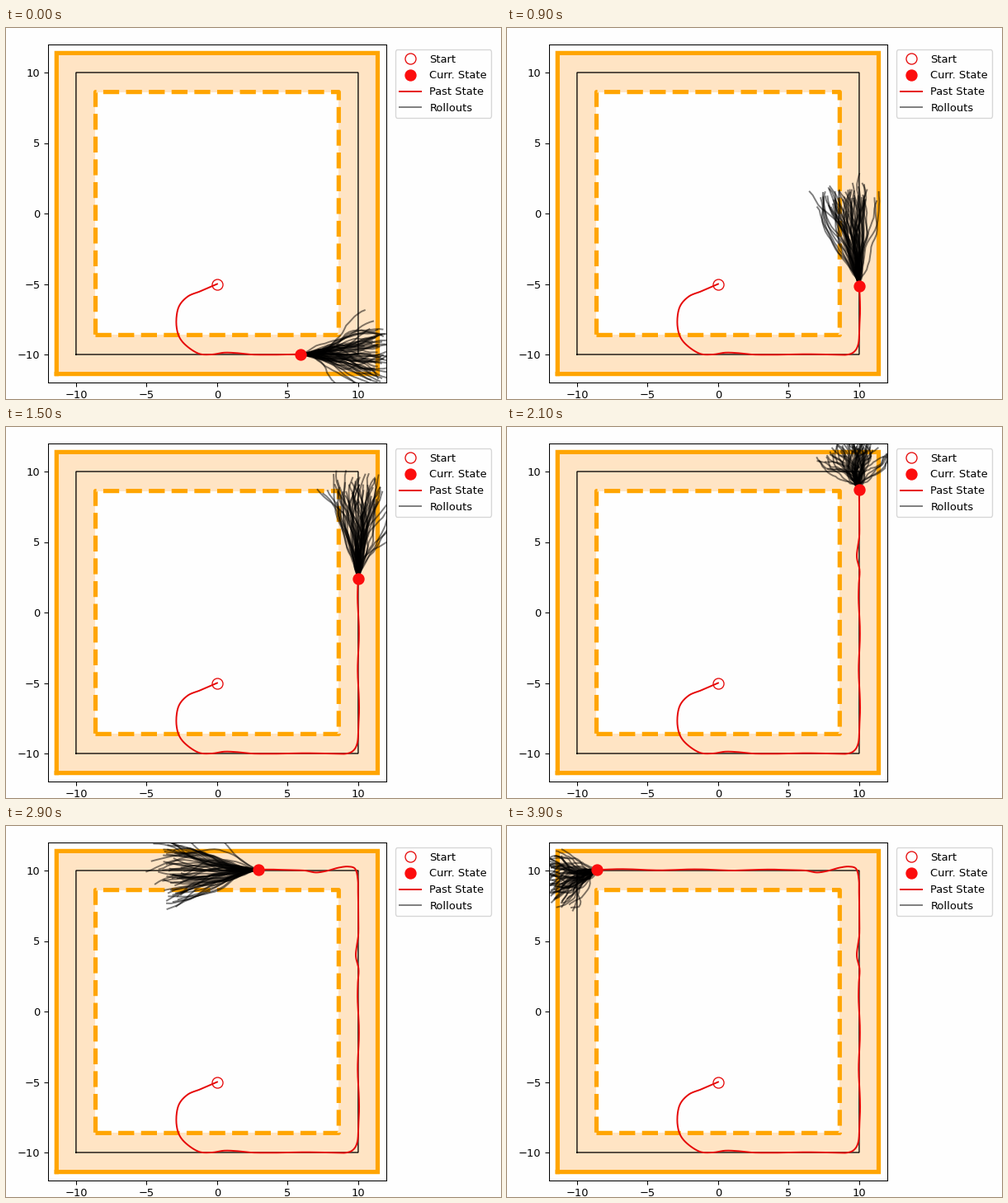
Animation of 600x450 px, one loop 4 s. Source, as a matplotlib script:

```python
import numpy as np
import matplotlib.pyplot as plt
from matplotlib.animation import FuncAnimation
from matplotlib.collections import LineCollection
from matplotlib.patches import Rectangle

W, H, DPI = 600, 450, 93.75
UNIT = 17.1              # pixels per data unit
CX, CY = 255.9, 225      # pixel position of the data origin
FRAMES, INTERVAL = 40, 100
ROLLOUTS, STEPS = 60, 20
INNER, OUTER = 8.62, 11.38
PAPER, TRAIL = "#fefefe", "#e60808"


def side(start, end, wobble=0.05):
    """Waypoints about one unit apart, swaying around a straight line."""
    start, end = np.array(start, float), np.array(end, float)
    dist = np.hypot(*(end - start))
    t = np.linspace(0, 1, round(dist) + 1)[:, None]
    normal = (end - start)[::-1] * (1, -1) / dist
    return start + t * (end - start) + wobble * np.sin(1.2 * dist * t) * normal


def smooth(p, n=16):
    """Catmull-Rom curve through the points."""
    p = np.vstack([2 * p[0] - p[1], p, 2 * p[-1] - p[-2]])
    t = np.linspace(0, 1, n, endpoint=False)[:, None]
    parts = []
    for a, b, c, d in zip(p, p[1:], p[2:], p[3:]):
        parts.append(b + 0.5 * t * (c - a + t * (2 * a - 5 * b + 4 * c - d
                                                 + t * (3 * (b - c) + d - a))))
    return np.vstack(parts + [p[-2:-1]])


path = smooth(np.vstack([
    [(0, -5), (-1.15, -5.5), (-2.1, -5.9), (-2.75, -6.7), (-2.88, -8),
     (-2.5, -9.05), (-1.4, -9.9), (-0.4, -10), (0.5, -9.87), (1.4, -9.9)],
    side((2.4, -10), (9.1, -10), 0.02),
    [(9.65, -9.8), (9.95, -9.2)],
    side((10.02, -8), (10, 3)),
    [(9.83, 4)],
    side((10, 5.3), (10, 9.3), 0.02),
    [(9.8, 10.1), (9.3, 10.28), (8.6, 10.2), (7.8, 9.98), (7, 9.86), (6.2, 10)],
    side((5, 10.03), (-10, 10.07), 0.04)]))
arc = np.r_[0, np.cumsum(np.hypot(*np.diff(path, axis=0).T))]


def point(s):
    return np.array([np.interp(s, arc, path[:, 0]), np.interp(s, arc, path[:, 1])])


def arc_near(x, y):
    return arc[np.argmin(np.hypot(*(path - (x, y)).T))]


CORNERS = [arc_near(10, -10), arc_near(10, 10), arc_near(-10, 10)]


def pace(s):
    """Frames per unit of distance; the car brakes just before each corner."""
    return 0.8 + sum(0.65 * np.exp(-((s - c + 1) / 2) ** 2) for c in CORNERS)


road = np.linspace(arc_near(5.95, -10), arc_near(-8.55, 10.1), 2000)
clock = np.r_[0, np.cumsum(pace(road[1:]))]
clock *= (FRAMES - 1) / clock[-1]


def fan(frame, s):
    """Random rollouts: headings wander but drift back to the driving direction."""
    rng = np.random.default_rng(40 + frame)
    speed = 1 / pace(s)
    dx, dy = point(s) - point(s - 0.5)
    heading = np.arctan2(dy, dx) + 0.4 * (1.25 - speed) + rng.normal(0, 0.06)
    step = 5.2 * speed / STEPS * rng.normal(1, 0.1, ROLLOUTS)
    turn = np.zeros(ROLLOUTS)
    dots = [np.tile(point(s), (ROLLOUTS, 1))]
    for _ in range(STEPS):
        turn = 0.92 * turn + rng.normal(0, 0.17 / speed, ROLLOUTS)
        move = step * np.array([np.cos(heading + turn), np.sin(heading + turn)])
        dots.append(dots[-1] + move.T)
    return np.stack(dots, axis=1)


def square(half, color, z):
    ax.add_patch(Rectangle((-half, -half), 2 * half, 2 * half,
                           fc=color, ec="none", zorder=z))


def outline(half, **style):
    x = np.array([-1, 1, 1, -1, -1]) * half
    y = np.array([-1, -1, 1, 1, -1]) * half
    ax.plot(x, y, solid_joinstyle="miter", snap=False, **style)


fig = plt.figure(figsize=(W / DPI, H / DPI), dpi=DPI, facecolor=PAPER)
width = 24 * UNIT
ax = fig.add_axes([(CX - width / 2) / W, 1 - (CY + width / 2) / H,
                   width / W, width / H], facecolor=PAPER)
ax.set(xlim=(-12, 12), ylim=(-12, 12),
       xticks=range(-10, 11, 5), yticks=range(-10, 11, 5))

square(OUTER, "bisque", 0.5)
square(INNER, PAPER, 0.6)
outline(10, color="black", lw=1)
outline(OUTER, color="orange", lw=4)
outline(INNER, color="orange", lw=4, ls="--")

rolls = LineCollection([], colors="black", alpha=0.5, lw=1.5, zorder=3)
ax.add_collection(rolls, autolim=False)
ax.plot(*path[0], "o", color=TRAIL, ms=10, fillstyle="none", zorder=5, label="Start")
curr, = ax.plot([], [], "o", color="#fc0d0d", ms=10, zorder=6, label="Curr. State")
past, = ax.plot([], [], color=TRAIL, lw=1.5, zorder=4, label="Past State")
ax.plot([], [], "k-", lw=1.5, alpha=0.5, label="Rollouts")
ax.legend(loc="upper left", bbox_to_anchor=(1.01, 1), labelspacing=0.52)


def update(frame):
    s = np.interp(frame, clock, road)
    pos = point(s)
    past.set_data(*np.vstack([path[arc < s], pos]).T)
    curr.set_data([pos[0]], [pos[1]])
    rolls.set_segments(fan(frame, s))
    return rolls, past, curr


anim = FuncAnimation(fig, update, frames=FRAMES, interval=INTERVAL, repeat=True)
plt.show()
```
